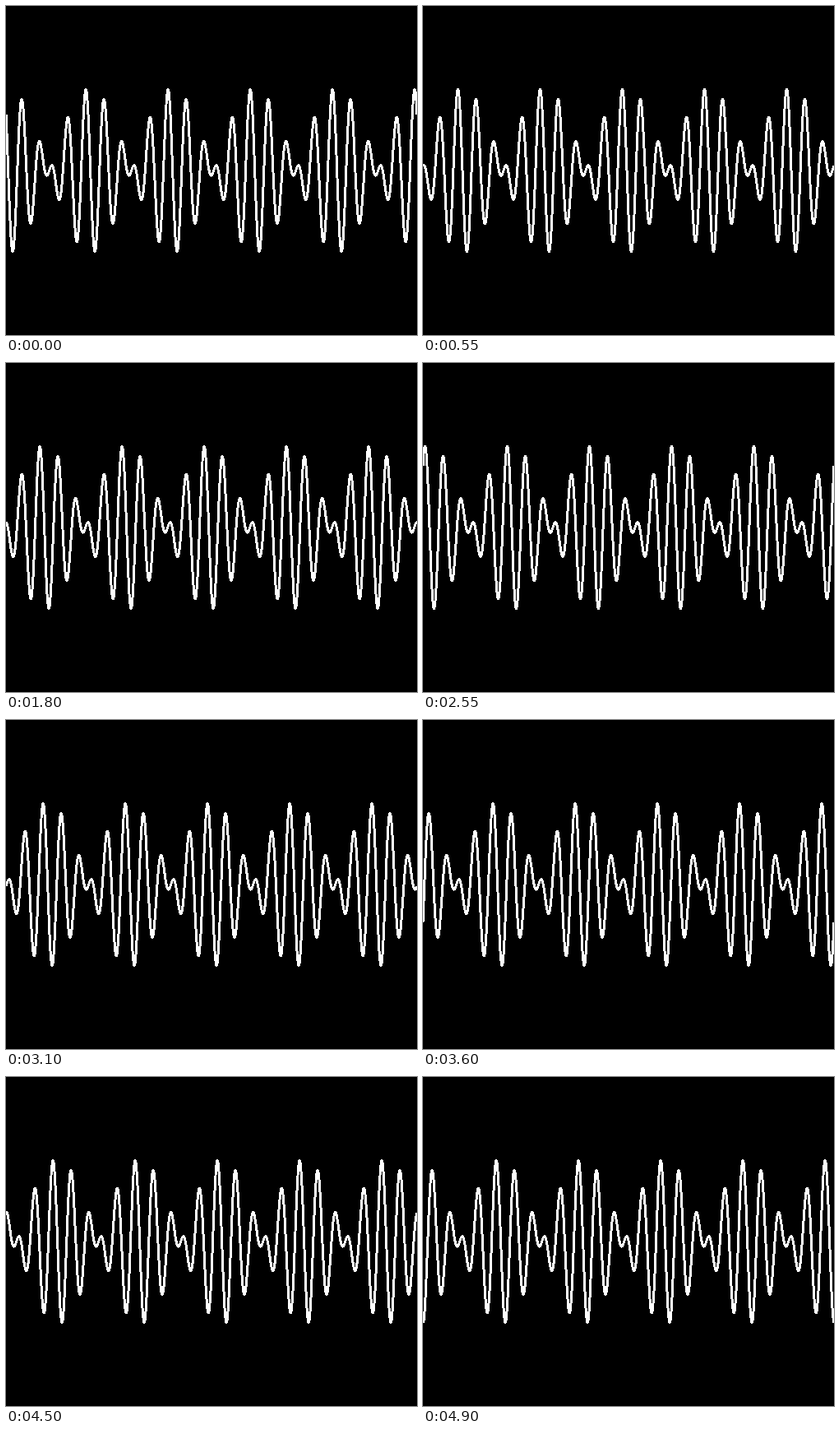
These frames come from a looping animation (500 by 400 pixels, 4950 ms). An HTML page:

```html
<!DOCTYPE html>
<html lang="en">
<head>
<meta charset="utf-8">
<title>Travelling beat wave</title>
<style>
  html, body { margin: 0; width: 100%; height: 100%; overflow: hidden; background: #000; }
  svg { display: block; }
  polyline { fill: none; stroke: #fff; stroke-width: 3; stroke-linejoin: round; shape-rendering: crispEdges; }
</style>
</head>
<body>
<svg width="500" height="400"><polyline id="wave"/></svg>
<script>
const LOOP = 4950, FRAME = 50;
const PERIOD = 100, AMPLITUDE = 50, MIDDLE = 200;
const STEP = 8 / 3; // pixels travelled per 1/30 s

const wave = document.getElementById('wave');

// Two sines, 4 and 5 cycles per period, beat against each other.
function waveY(x, shift) {
  const angle = 2 * Math.PI * (x - shift) / PERIOD;
  return MIDDLE + AMPLITUDE * (Math.sin(4 * angle) + Math.sin(5 * angle));
}

function draw(time) {
  // The 30 Hz motion is shown at 20 Hz, so steps alternate in length.
  const frame = Math.floor((time % LOOP) / FRAME);
  const shift = STEP * (Math.round(frame * 1.5) + 1);

  const points = [];
  for (let x = 0; x <= 500; x += 0.5) points.push(x + ',' + waveY(x, shift).toFixed(2));
  wave.setAttribute('points', points.join(' '));
}

const start = performance.now();
function tick() {
  draw(performance.now() - start);
  requestAnimationFrame(tick);
}
tick();
</script>
</body>
</html>
```
